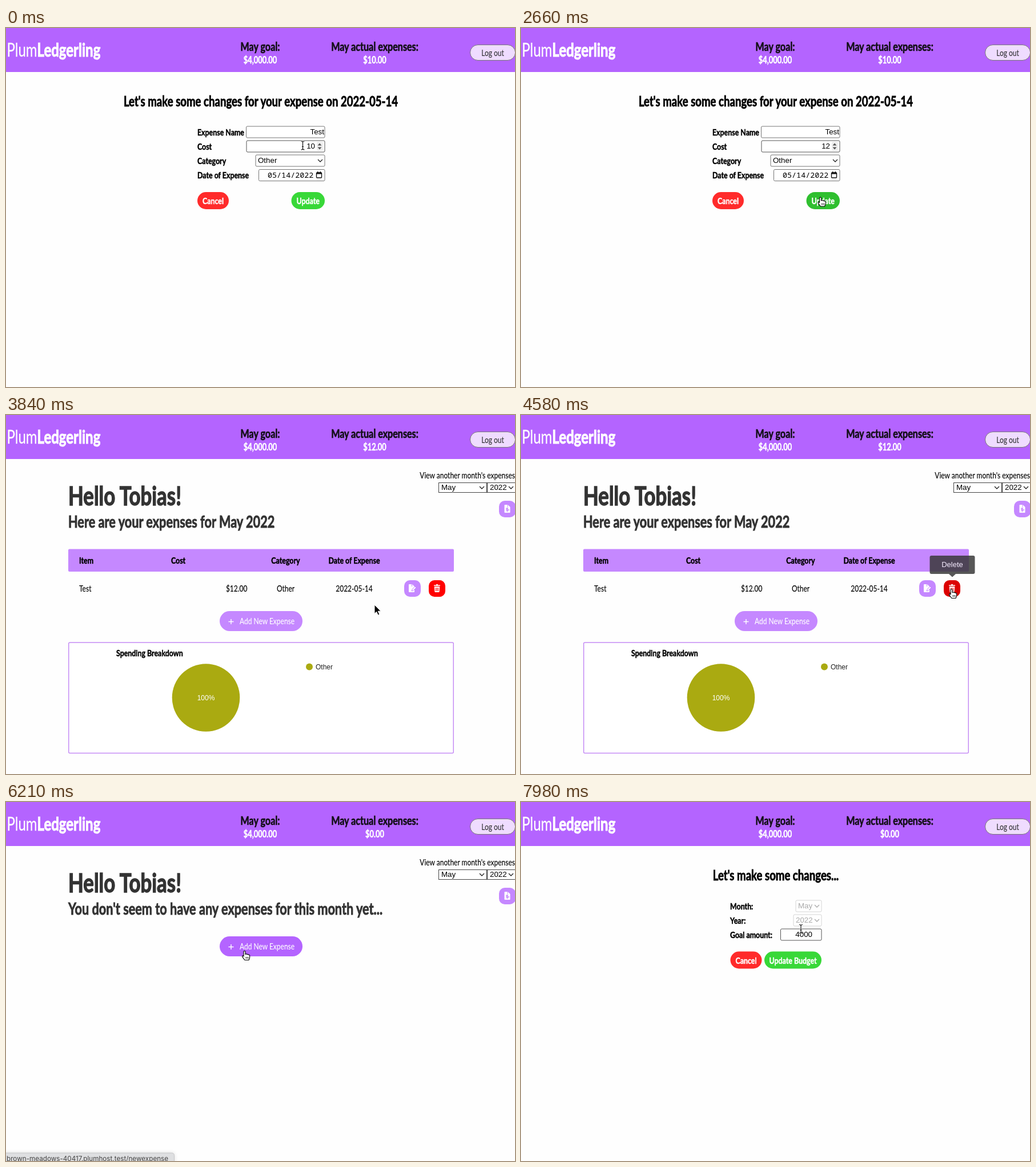
An HTML page that plays this animation: 891x628 px, repeating every 8000 ms.

```html
<!DOCTYPE html>
<html lang="en">
<head>
<meta charset="utf-8">
<title>Expense tracker</title>
<style>
  html, body { margin: 0; width: 100%; height: 100%; overflow: hidden; background: #fefefe; }
  svg { display: block; width: 891px; height: 628px; }
  text { stroke-width: 0; }
  .n { font-family: Lato, "Open Sans", sans-serif; stroke-width: .008em; }
  .b { font-weight: 700; stroke-width: .032em; }
  .a { font-family: "Liberation Sans", Arial, sans-serif; }
  .m { font-family: "Noto Sans Mono", monospace; }
  .i { font-family: Inter, sans-serif; }
</style>
</head>
<body>
<svg id="stage" viewBox="0 0 891 628"></svg>
<script>
const PURPLE = '#b464ff', LILAC = '#c588ff', RED = '#ff2b2b', GREEN = '#38d838', INK = '#333';
const TICK = 147.7, LOOP = 8000;
const HOST = 'brown-meadows-40417.plumhost.test';
const NARROW = { n: 0.75, 'n b': 0.775 };   // condensed cut of the UI face

const rect = (x, y, w, h, r, fill, stroke = 'none', extra = '') =>
  `<rect x="${x}" y="${y}" width="${w}" height="${h}" rx="${r}" fill="${fill}" stroke="${stroke}" ${extra}/>`;
const text = (cls, x, y, size, str, fill = '#000', anchor = 'start', id = '') =>
  `<text class="${cls}" ${id && `id="${id}"`} transform="translate(${x} ${y}) scale(${NARROW[cls] || 1} 1)"
    font-size="${size}" fill="${fill}" stroke="${fill}" text-anchor="${anchor}">${str}</text>`;
const path = (d, fill, stroke = 'none', w = 1, extra = '') =>
  `<path d="${d}" fill="${fill}" stroke="${stroke}" stroke-width="${w}" ${extra}/>`;
const group = (id, ...parts) => `<g id="${id}">${parts.join('')}</g>`;
const at = (x, y, s) => `<g transform="translate(${x} ${y})">${s}</g>`;

const bold = (x, y, s, ...o) => text('n b', x, y, 16, s, ...o);
const plain = (x, y, s, ...o) => text('n', x, y, 16, s, ...o);
const field = (x, y, s, ...o) => text('a', x, y, 13.33, s, ...o);
const box = (x, y, w, stroke = '#767676', id = '') => rect(x, y, w, 20, 2, '#fff', stroke, id);
const chevron = (x, y, c = '#222') => path(`M${x - 4} ${y - 2}l4 4 4-4`, 'none', c, 1.3);
const pill = (x, y, w, fill, label, id = '') =>
  rect(x, y, w, 30, 15, fill, 'none', id) + bold(x + w / 2, y + 21, label, '#fff', 'middle');

const fileIcon = path('M-5-6q0-1 1-1h4v4h5v9q0 1-1 1h-8q-1 0-1-1zM1-7l4 4h-4z', '#fff');
const dollar = path('M1.8-.8q-3.6-1-3.6 1t3.6 1.7-3.6 1.5M0-2v7.5', 'none', LILAC, 1.2);
const pen = path('M0 5l1-3 5-5 2 2-5 5z', '#fff', LILAC, 1);
const trash = path('M-5.5-5.5h3.5l1-1.5h2l1 1.5h3.5v1.5h-11zM-4.7-3h9.4l-.6 9q0 1-1 1h-6.2q-1 0-1-1z', '#fff')
  + path('M-2.2-1v6M0-1v6M2.2-1v6', 'none', '#f00', 1);

const header = rect(0, 0, 891, 77, 0, PURPLE)
  + text('n', 1.5, 50, 32, 'Plum<tspan class="b">Ledgerling</tspan>', '#fff')
  + text('n b', 445, 40, 20.8, 'May goal:', '#151019', 'middle')
  + text('n b', 645.5, 40, 20.8, 'May actual expenses:', '#151019', 'middle')
  + text('n b', 445, 62, 16.6, '$4,000.00', '#fff', 'middle')
  + text('n b', 645.5, 62, 16.6, '', '#fff', 'middle', 'spent')
  + rect(812.5, 29.5, 79, 27, 13.5, '#efdcff', '#777')
  + plain(852, 49, 'Log out', INK, 'middle');

const expensePage = group('expense',
  text('n b', 446, 137, 24, "Let's make some changes for your expense on 2022-05-14", '#000', 'middle'),
  ['Expense Name', 'Cost', 'Category', 'Date of Expense'].map((s, i) => bold(335, 188 + 25 * i, s)).join(''),
  box(420.5, 172, 137.5), field(557, 186, 'Test', '#000', 'end'),
  box(421, 197, 137, '#555', 'id="costBox"'), field(541, 211, '', '#000', 'end', 'cost'),
  rect(541.3, 200.5, 1, 14, 0, '#000', 'none', 'id="caret"'),
  rect(544, 199, 11, 16, 2, '#eee', 'none', 'id="spin"'),
  path('M545.5 205.5l3.5-4 3.5 4zM545.5 208.5l3.5 4 3.5-4z', '#555'),
  box(437, 222, 121), field(441, 236, 'Other'), chevron(550, 232),
  box(442.5, 247.5, 115.5), text('m', 458, 262, 13.4, '05/14/2022'),
  rect(543.5, 253, 9, 9, 1, 'none', '#111', 'stroke-width="1.4"') + path('M543 253h10v2.5h-10zM545 251h1.5v2h-1.5zM549.5 251h1.5v2h-1.5z', '#111'),
  pill(335, 287, 55, RED, 'Cancel'), pill(499.5, 287, 58.5, GREEN, 'Update', 'id="update"'));

const homePage = group('home',
  text('n b', 109, 158, 45, 'Hello Tobias!', INK),
  text('n b', 109, 197, 28, '', INK, 'start', 'lead'),
  plain(891, 111, "View another month's expenses", '#000', 'end'),
  rect(757.5, 118.5, 84, 17, 0, '#fff', '#444'), field(762, 131, 'May'), chevron(833, 127),
  rect(842.5, 118.5, 52, 17, 0, '#fff', '#444'), field(847, 131, '2022'), chevron(884, 127),
  rect(863, 150, 29, 29, 10, LILAC, 'none', 'id="budgetBtn"'), at(877.5, 164, fileIcon + dollar),
  group('table',
    rect(109, 234.5, 675, 39.5, 2, LILAC),
    bold(128, 260, 'Item'), bold(289, 260, 'Cost'),
    bold(489.5, 260, 'Category', '#000', 'middle'), bold(609.5, 260, 'Date of Expense', '#000', 'middle'),
    plain(128, 309, 'Test'), plain(422.5, 309, '$12.00', '#000', 'end'),
    plain(489.5, 309, 'Other', '#000', 'middle'), plain(609.5, 309, '2022-05-14', '#000', 'middle'),
    rect(697, 289, 29, 29, 10, LILAC), at(710, 303, fileIcon + pen),
    rect(740, 289, 29, 29, 10, '#f00', 'none', 'id="deleteBtn"'), at(754.5, 303, trash),
    rect(109.75, 398, 673.5, 193.5, 2, '#fff', '#c58cf5', 'stroke-width="1.5"'),
    bold(193, 422, 'Spending Breakdown'),
    '<circle cx="350" cy="494.5" r="59.3" fill="#aaaa11"/><circle cx="531" cy="440.5" r="6" fill="#aaaa11"/>',
    text('a', 350, 499, 12, '100%', '#fff', 'middle'), text('a', 542, 445, 12, 'Other', '#222')),
  group('add',
    rect(374, 343, 145, 35, 17.5, LILAC, 'none', 'id="addBtn"'),
    path('M389.5 361.5h9M394 357v9', 'none', '#fff', 1.4),
    plain(409, 366, 'Add New Expense', '#fff')),
  group('tipDelete', rect(715.5, 246, 79, 32, 3, '#383838'), path('M749 278h12l-6 5.5z', '#383838'),
    text('a', 755, 266, 13, 'Delete', '#fff', 'middle')),
  group('tipBudget', rect(744.5, 141.5, 107, 32, 3, '#383838'), path('M851 152v11l5.5-5.5z', '#383838'),
    text('a', 798, 162, 13, 'Edit Budget', '#fff', 'middle')));

const budgetPage = group('budget',
  text('n b', 446, 137, 24, "Let's make some changes...", '#000', 'middle'),
  ['Month:', 'Year:', 'Goal amount:'].map((s, i) => bold(366, 188 + 25 * i, s)).join(''),
  box(481, 172, 45, '#d5d5d5'), field(485, 186, 'May', '#aaa'), chevron(518, 182, '#aaa'),
  box(477, 197, 49, '#d5d5d5'), field(481, 211, '2022', '#aaa'), chevron(518, 207, '#aaa'),
  box(454.5, 222, 71.5, '#555'), field(510, 236, '4000', '#000', 'end'),
  pill(366.5, 261.5, 55, RED, 'Cancel'), pill(426, 261.5, 100, GREEN, 'Update Budget'));

const status = group('status',
  path('M-2 630v-16h292q4.500 0 4.500 4.500v12z', '#dedfe1', '#c6c6c8', 1, 'style="filter:drop-shadow(0 0 3px #0002)"'),
  text('i', 1, 628, 11.7, '', '#444', 'start', 'statusText'));

const beam = 'M-3-7.5q3 0 3 2 0-2 3-2M-3 7.5q3 0 3-2 0 2 3 2M0-6v12M-1.5 2h3';
const pointers = group('arrow', path('M0 0v15.5l3.6-3.3 2.6 5.8 2.6-1.2-2.6-5.6h4.9z', '#000', '#fff', 1))
  + group('hand', path('M-1.500 1q1.500-2 3 0v5l1-.6q1.500-.4 2 .8 1.500-.8 2.400.6 2-.4 2.200 1.500v3.500l-1.500 4.200h-7.200l-4-5.300q-.8-2 .8-2.300l1.300 1z', '#fff', '#000', 1.1)
    + path('M2.5 10.500v3M4.5 10.500v3M6.5 10.500v3', 'none', '#000', 0.8))
  + group('ibeam', path(beam, 'none', '#fff', 2.6) + path(beam, 'none', '#111', 1.2));

document.getElementById('stage').innerHTML =
  header + expensePage + homePage + budgetPage + status + group('pointer', pointers);
const el = id => document.getElementById(id);

// Each entry: tick, then what changes from that tick on.
const EVENTS = [
  [0, { page: 'expense', cost: '10', spent: '$10.00', focus: 0, hover: '', status: '', tip: 0, rows: 1 }],
  [2, { focus: 1 }],
  [10, { cost: '1' }], [11, { cost: '12' }],
  [14, { hover: 'update' }],
  [18, { focus: 0 }],
  [21, { page: 'home', spent: '$12.00', hover: '', status: `Waiting for ${HOST}...` }],
  [23, { status: '' }],
  [30, { hover: 'deleteBtn', tip: 0.3 }], [31, { tip: 0.84 }], [32, { tip: 1 }],
  [36, { rows: 0, spent: '$0.00', hover: '', tip: 0 }],
  [41, { hover: 'addBtn' }], [42, { status: `${HOST}/newexpense` }],
  [44, { hover: '' }], [45, { status: '' }],
  [47, { hover: 'budgetBtn', tip: 0.7, status: `${HOST}/editbudget/1` }], [48, { tip: 1 }],
  [49, { page: 'budget', hover: '', tip: 0, status: `Waiting for ${HOST}...` }],
  [51, { status: '' }]
];
const MOVES = [
  [0, 519.5, 205.5, 'ibeam'], [1, 531, 207, 'ibeam'], [2, 541, 208, 'ibeam'], [3, 551, 209, 'arrow'], [4, 542.5, 209, 'arrow'],
  [12, 541, 222, 'arrow'], [13, 536, 252, 'arrow'], [14, 527, 288, 'hand'], [15, 524, 296, 'hand'],
  [21, 523.5, 295.5, 'arrow'], [23, 548, 304, 'arrow'], [24, 611, 322, 'arrow'],
  [26, 645, 332, 'arrow'], [27, 690, 339, 'arrow'], [28, 725, 333, 'arrow'], [29, 746, 320, 'arrow'], [30, 753.5, 304.5, 'hand'],
  [36, 735, 302, 'arrow'], [37, 680, 294, 'arrow'], [38, 595, 284, 'arrow'], [39, 510, 276, 'arrow'], [40, 445, 272, 'arrow'],
  [41, 417.5, 260.5, 'hand'], [43, 432, 256, 'hand'], [44, 530, 234, 'arrow'], [45, 655, 207, 'arrow'], [46, 780, 183, 'arrow'],
  [47, 868, 168, 'arrow'], [48, 874, 168, 'arrow'], [50, 850, 174, 'arrow'], [51, 760, 190, 'arrow'],
  [52, 630, 207, 'arrow'], [53, 525, 218, 'arrow'], [54, 490, 222, 'ibeam']
];
const HOVER = { update: [GREEN, '#2fbf2f'], deleteBtn: ['#f00', '#dc0000'], addBtn: [LILAC, PURPLE], budgetBtn: [LILAC, PURPLE] };

const show = (id, on) => el(id).setAttribute('display', on ? 'inline' : 'none');
const set = (id, props) => { for (const k in props) el(id).setAttribute(k, props[k]); };

function draw(tick) {
  const s = Object.assign({}, ...EVENTS.filter(e => e[0] <= tick).map(e => e[1]));
  const [, x, y, kind] = MOVES.filter(m => m[0] <= tick).pop();

  for (const p of ['expense', 'home', 'budget']) show(p, s.page === p);
  for (const k of ['arrow', 'hand', 'ibeam']) show(k, kind === k);
  set('pointer', { transform: `translate(${x} ${y})` });

  el('spent').textContent = s.spent;
  el('cost').textContent = s.cost;
  show('caret', s.focus);
  set('costBox', { stroke: s.focus ? '#1a66cc' : '#555', 'stroke-width': s.focus ? 2 : 1 });
  set('spin', { fill: s.focus ? '#d8d8d8' : '#eee' });
  for (const id in HOVER) set(id, { fill: HOVER[id][+(s.hover === id)] });

  show('table', s.rows);
  set('add', { transform: `translate(0 ${s.rows ? 0 : -108})` });
  el('lead').textContent = s.rows ? 'Here are your expenses for May 2022' : "You don't seem to have any expenses for this month yet...";
  set('tipDelete', { opacity: s.hover === 'deleteBtn' ? s.tip : 0 });
  set('tipBudget', { opacity: s.hover === 'budgetBtn' ? s.tip : 0 });
  show('status', s.status);
  el('statusText').textContent = s.status;
}

const start = performance.now();
let last = -1;
function frame() {
  const t = (performance.now() - start) % LOOP;
  const tick = Math.min(54, Math.floor((t + 12) / TICK));
  if (tick !== last) draw(last = tick);
  requestAnimationFrame(frame);
}
frame();
</script>
</body>
</html>
```
